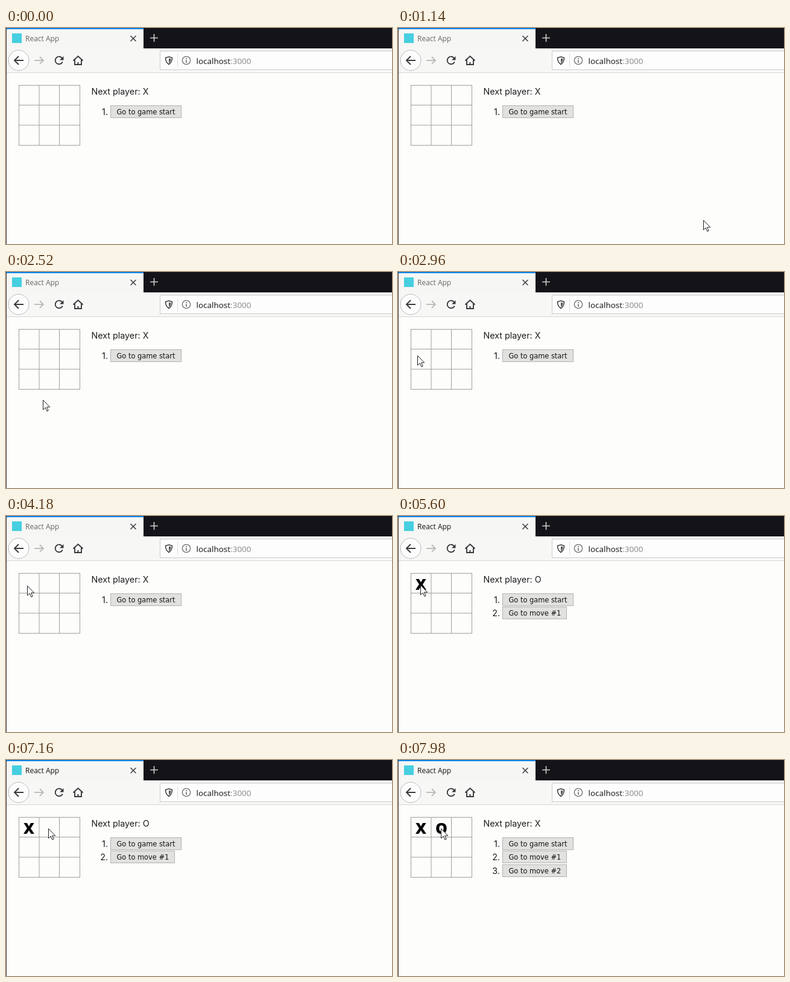
An HTML page that plays this animation: 640 by 360 pixels, repeating every 8000 ms.

```html
<!DOCTYPE html>
<html lang="en">
<head>
<meta charset="utf-8">
<title>Tic-tac-toe</title>
<style>
  html, body { margin: 0; width: 100%; height: 100%; overflow: hidden; background: #fdfdfc; }
  svg { display: block; width: 640px; height: 360px; }
  .crisp { shape-rendering: crispEdges; }
  .icon { fill: none; stroke: #3a3a3c; stroke-width: 1.9; }
  .thin { stroke-width: 1.5; }
  .pale { stroke: #bcbcbc; }
  .ui { font: 12px "Open Sans", "Noto Sans", sans-serif; }
  .url { font-size: 13.5px; }
  .page { font: 14.3px Inter, sans-serif; fill: #1c1c1c; }
  .button { font: 11.4px "DejaVu Sans", sans-serif; fill: #141414; }
  .mark { font: 800 25px "Open Sans", "Noto Sans", sans-serif; fill: #040404; text-anchor: middle; }
</style>
</head>
<body>
<svg viewBox="0 0 640 360">
  <rect width="640" height="360" fill="#fdfdfc"/>

  <!-- Tab strip -->
  <g class="crisp">
    <rect width="640" height="34" fill="#141418"/>
    <rect x="1" width="227" height="34" fill="#f6f6f5"/>
    <rect width="228" height="2" fill="#0a84e8"/>
    <rect x="10" y="9" width="16" height="16" fill="#45cfe0"/>
  </g>
  <text id="title" class="ui" x="32" y="22">React App</text>
  <path class="icon thin" d="M206.5 13l9 9m0-9l-9 9"/>
  <path d="M239 16.5h13M245.5 10v13" stroke="#d0d0d0" stroke-width="1.6"/>

  <!-- Toolbar -->
  <g class="crisp">
    <rect y="34" width="640" height="40" fill="#f7f7f6"/>
    <rect y="74" width="640" height="1" fill="#d6d6d6"/>
    <rect x="255.5" y="38.5" width="400" height="31" fill="#fdfdfd" stroke="#cbcbcb"/>
    <path d="M284.5 43v22" stroke="#dcdcdc"/>
  </g>
  <circle cx="21" cy="54" r="17" fill="#fdfdfd" stroke="#b9b9b9"/>
  <path class="icon" d="M29 54H14m7-7l-7 7 7 7"/>
  <path class="icon pale" d="M47 54h15m-6-6l6 6-6 6"/>
  <path class="icon" d="M93.5 51a6.3 6.3 0 1 0 .2 5.5"/>
  <path d="M95.5 47v6.5H89z" fill="#3a3a3c"/>
  <path class="icon" d="M111.5 54.5l8-7.5 8 7.5M114 53v8h11v-8M119.5 61v-4"/>
  <path class="icon thin" d="M270 48l5.500 1.500c0 5-1.500 8.500-5.500 11-4-2.500-5.500-6-5.500-11z"/>
  <path d="M270 50.500l3.500 1c0 3-1 5.500-3.500 7z" fill="#55555a"/>
  <circle cx="299" cy="54" r="6.700" fill="none" stroke="#6d6d70" stroke-width="1.300"/>
  <path d="M299 50v2m0 1.300v4.700" stroke="#6d6d70" stroke-width="1.600"/>
  <text class="ui url" x="315.500" y="60" fill="#111">localhost<tspan fill="#888">:3000</tspan></text>

  <!-- Game -->
  <g fill="none" stroke="#a0a09c">
    <path d="M21 128.500h102M21 162h102M21 195.500h102M55 95v101M88.500 95v101M122.500 95v101"/>
    <path d="M21 95.500h102M21.500 95v101"/>
  </g>
  <text id="status" class="page" x="141.500" y="111"></text>
  <g id="moves"></g>
  <text id="markX" class="mark" x="38" y="122.500">X</text>
  <text id="markO" class="mark" x="72" y="122.500">O</text>

  <rect class="crisp" width="1" height="360" fill="#38383a"/>
  <path id="cursor" d="M.5.5v16l3.700-3.500 2.700 6 2.300-1-2.600-5.900h5.100z" fill="#fdfdfd" stroke="#222"/>
</svg>
<script>
const LOOP = 8000, FOCUS = 4680, PLAY_X = 4740, PLAY_O = 7720;

// Pointer path: time, x, y
const path = [
  [880, 640, 296], [1250, 450, 330], [1680, 240, 344], [2080, 126, 331],
  [2500, 62, 217], [2960, 32, 139], [3340, 29, 128], [4180, 35, 116],
  [4700, 37, 115], [5700, 37, 115], [6420, 62, 114], [7000, 69, 114], [7560, 71, 114]
];

const byId = id => document.getElementById(id);
const [title, status, moves, markX, markO, cursor] =
  ["title", "status", "moves", "markX", "markO", "cursor"].map(byId);
const show = (element, visible) => element.setAttribute("visibility", visible ? "visible" : "hidden");

moves.innerHTML = ["game start", "move #1", "move #2"].map((label, i) => {
  const top = 129 + Math.round(i * 22.4);
  return `<g>
    <text class="page" x="169" y="${top + 16}" text-anchor="end">${i + 1}.</text>
    <rect class="crisp" x="173.5" y="${top + 0.5}" width="${i ? 106 : 117}" height="20" fill="#e1e1e0" stroke="#b2b2b0"/>
    <text class="button" x="183.5" y="${top + 15}">Go to ${label}</text>
  </g>`;
}).join("");

function pointerAt(t) {
  const next = path.findIndex(point => point[0] > t);
  if (next < 0) return path.at(-1).slice(1);
  if (next === 0) return [660, 296];
  const [t0, x0, y0] = path[next - 1], [t1, x1, y1] = path[next];
  const k = (t - t0) / (t1 - t0);
  return [x0 + (x1 - x0) * k, y0 + (y1 - y0) * k].map(Math.round);
}

function draw() {
  const t = performance.now() % LOOP;
  const turn = (t >= PLAY_X) + (t >= PLAY_O);
  title.setAttribute("fill", t < FOCUS ? "#666" : "#111");
  status.textContent = "Next player: " + (turn === 1 ? "O" : "X");
  show(markX, turn >= 1);
  show(markO, turn >= 2);
  [...moves.children].forEach((row, i) => show(row, i <= turn));
  cursor.setAttribute("transform", `translate(${pointerAt(t)})`);
  requestAnimationFrame(draw);
}
draw();
</script>
</body>
</html>
```
